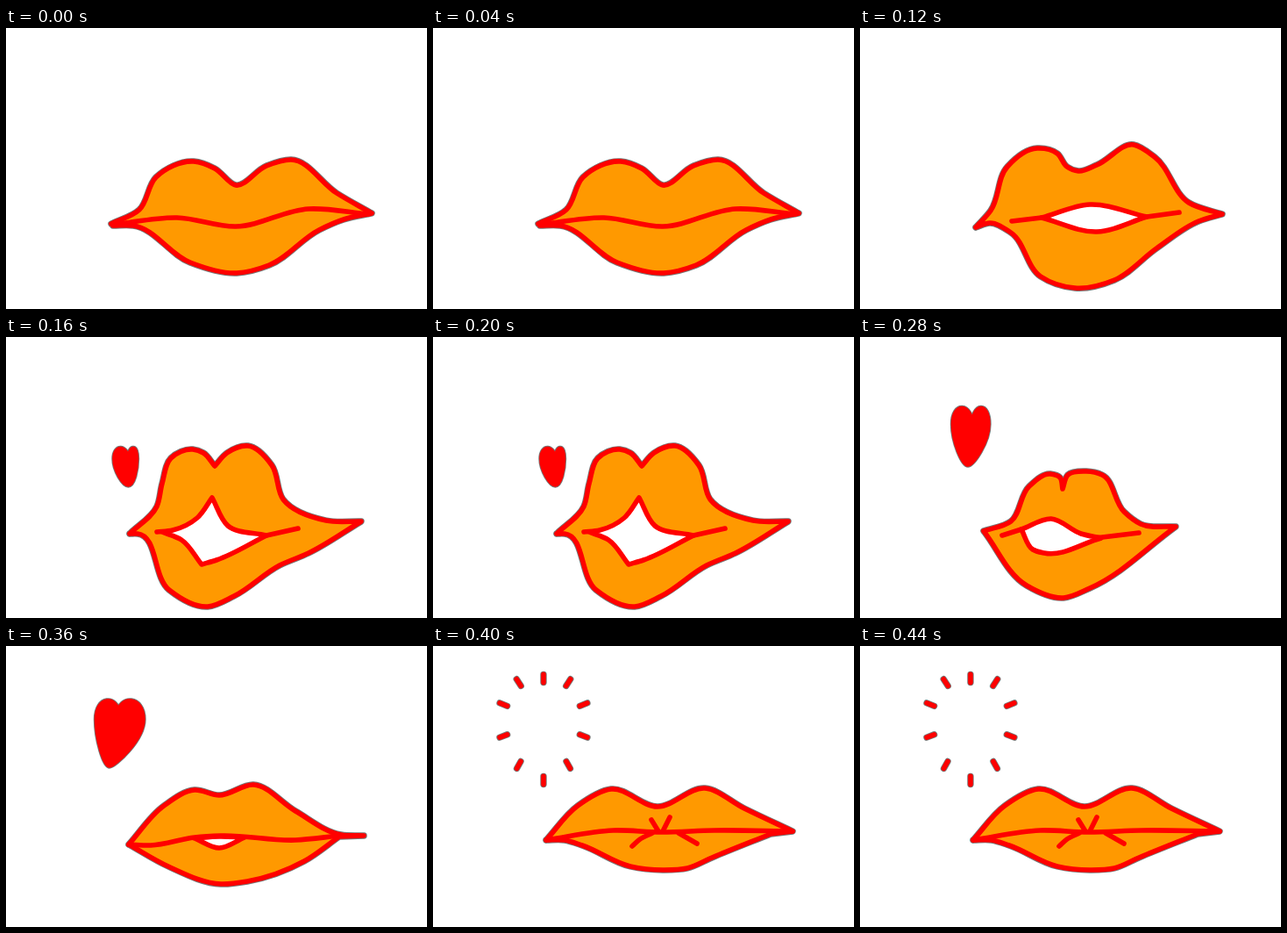
Animation, 480 px wide and 320 px high, one loop 0.48 s. Source, as an HTML page:

```html
<!DOCTYPE html>
<html>
<head>
<meta charset="utf-8">
<style>
html, body { margin: 0; width: 100%; height: 100%; overflow: hidden; background: #fff; }
svg { display: block; width: 480px; height: 320px; }
path { fill: none; stroke: #f00; stroke-width: 5.6; stroke-linecap: round; stroke-linejoin: round; }
.edge { stroke: #555; stroke-width: 7.4; stroke-opacity: .8; }
.lips { fill: #f90; }
.hole { fill: #fff; }
.heart { fill: #f00; }
</style>
</head>
<body>
<svg id="stage" viewBox="0 0 480 320"></svg>
<script>
const STEP = 80;

// Key points joined by smooth curves; "/" turns the point before it into a corner.
const poses = [
  {
    lips: '120,223 152,207 171,170 214,152 238,160 262,179 297,157 325,150 377,188 417,211 / 385,218 357,230 300,270 263,279 210,267 145,225 122,225',
    lines: ['122,224 195,216 262,226 345,206 413,212']
  },
  {
    lips: '132,227 149,208 168,158 202,137 225,143 236,158 249,163 270,156 312,133 336,147 375,199 413,212 / 386,220 338,251 290,287 245,296 206,283 172,233 148,222 132,227',
    hole: '207,216 262,201 327,215 / 270,232 207,216',
    lines: ['173,220 207,216', '327,215 364,210']
  },
  {
    lips: '141,224 172,193 178,167 188,138 213,128 225,132 238,147 / 252,132 276,124 303,146 316,185 365,209 405,210 / 345,246 312,260 260,295 230,307 186,288 150,224 141,224',
    hole: '172,222 190,220 218,206 235,183 / 253,215 297,226 / 240,254 223,259 / 200,231 178,222',
    lines: ['297,226 333,218'],
    heart: { notch: [139.5, 142], tip: [139.5, 168], left: 124, right: 148.5, top: 127.5 }
  },
  {
    lips: '141,221 172,210 193,170 217,156 228,160 231,173 / 237,157 258,153 276,157 301,199 320,213 360,216 / 262,286 232,297 190,283 141,221',
    hole: '184,219 218,207 252,224 275,229 / 210,246 197,242 184,219',
    lines: ['162,226 184,219', '268,229 318,223'],
    heart: { notch: [128, 102], tip: [123, 145], left: 106.5, right: 146, top: 81.5 }
  },
  {
    lips: '140,226 180,182 215,164 243,170 282,158 330,188 382,215 408,216 / 380,217 / 340,245 275,268 245,271 185,251 140,226',
    hole: '215,219 243,217 272,218 / 243,230 215,219',
    lines: ['140,226 165,227 215,218 245,216 330,221 380,216'],
    heart: { notch: [128, 77], tip: [118, 136], left: 103.5, right: 156, top: 63 }
  },
  {
    lips: '129,221 165,182 203,163 256,183 310,162 355,185 410,211 / 385,214 / 318,241 290,253 262,255 225,251 170,227 150,221 129,221',
    lines: [
      '129,221 205,210 260,212 320,210 410,211',
      '249,198 257,211', '270,195 262,211',
      '227,228 236,220 250,213', '280,213 301,225'
    ],
    sparks: 10
  }
];

const dist = (a, b) => Math.hypot(b[0] - a[0], b[1] - a[1]);

// Unit-speed slope at b, weighted by the distance to each neighbour.
function slope(a, b, c) {
  if (!a) a = b.map((v, k) => 2 * v - c[k]);
  if (!c) c = b.map((v, k) => 2 * v - a[k]);
  const p = dist(a, b), q = dist(b, c);
  return b.map((v, k) => ((v - a[k]) / p * q + (c[k] - v) / q * p) / (p + q));
}

function smooth(text) {
  let d = '', last;
  for (const run of text.split('/')) {
    const pts = run.trim().split(' ').map(p => p.split(',').map(Number));
    if (last) pts.unshift(last);
    else d = 'M' + pts[0];
    const slopes = pts.map((p, i) => slope(pts[i - 1], p, pts[i + 1]));
    for (let i = 1; i < pts.length; i++) {
      const b = pts[i - 1], c = pts[i], h = dist(b, c) / 3;
      const out = b.map((v, k) => v + slopes[i - 1][k] * h);
      const into = c.map((v, k) => v - slopes[i][k] * h);
      d += `C${out} ${into} ${c}`;
    }
    last = pts[pts.length - 1];
  }
  return d;
}

function heartShape({ notch, tip, left, right, top }) {
  const side = top + (tip[1] - top) * .28;
  const low = side + (tip[1] - side) * .45;
  const lobe = (top - (notch[1] + side) / 8) / .75;
  return `M${notch}C${notch[0] - 2},${lobe} ${left},${lobe} ${left},${side}`
    + `C${left},${low} ${tip[0] - 5},${tip[1]} ${tip}`
    + `C${tip[0] + 5},${tip[1]} ${right},${low} ${right},${side}`
    + `C${right},${lobe} ${notch[0] + 2},${lobe} ${notch}Z`;
}

// Dashes spread around a heart-like ring, all pointing to its middle.
function sparkShape(count) {
  let d = '';
  for (let i = 0; i < count; i++) {
    const turn = i / count * 2 * Math.PI, s = Math.sin(turn);
    const x = 126 + 48 * s;
    const y = 95 - 58 * Math.cos(turn) - 11 * Math.abs(s);
    const aim = Math.atan2(y - 85, x - 126);
    const dx = 4.6 * Math.cos(aim), dy = 4.6 * Math.sin(aim);
    d += `M${x - dx},${y - dy}L${x + dx},${y + dy}`;
  }
  return d;
}

const path = (d, kind) => `<path class="${kind}" d="${d}"/>`;
const edged = (d, kind) => path(d, 'edge') + path(d, kind);

function draw({ lips, hole, lines, heart, sparks }) {
  return edged(smooth(lips), 'lips')
    + (hole ? path(smooth(hole), 'hole') : '')
    + lines.map(l => path(smooth(l), 'line')).join('')
    + (heart ? edged(heartShape(heart), 'heart') : '')
    + (sparks ? edged(sparkShape(sparks), 'line') : '');
}

const stage = document.getElementById('stage');
const drawn = poses.map(draw);
const start = performance.now();
let shown = -1;

function render(now) {
  const i = Math.floor(Math.max(0, now - start) / STEP) % drawn.length;
  if (i !== shown) stage.innerHTML = drawn[shown = i];
  requestAnimationFrame(render);
}
render(start);
</script>
</body>
</html>
```
